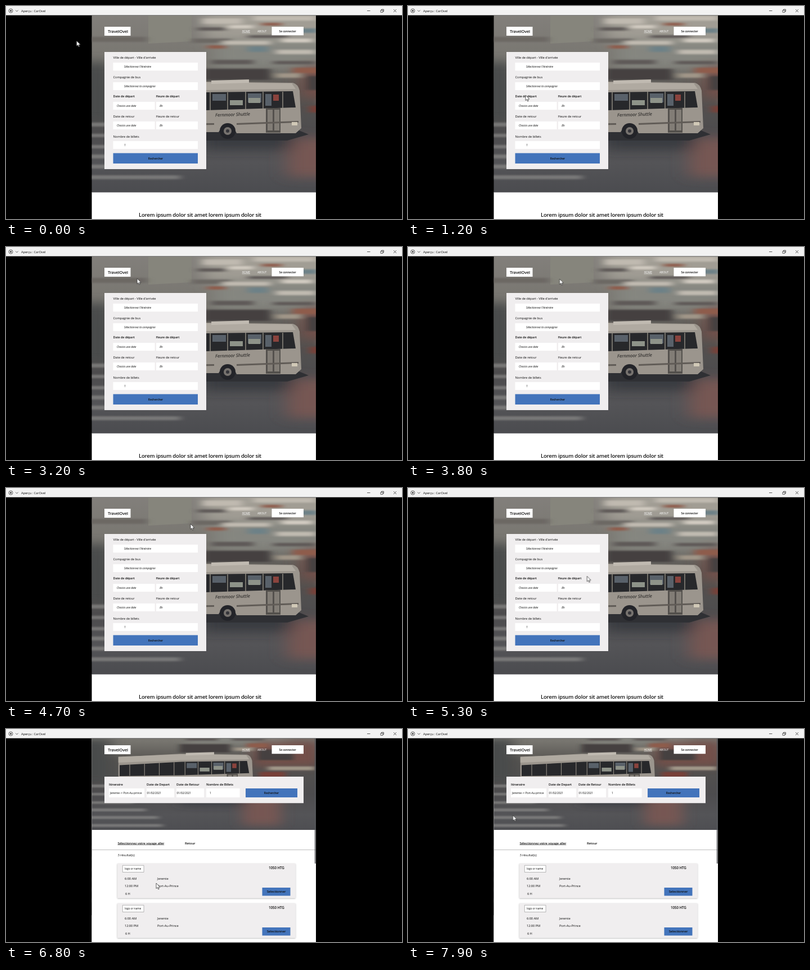
An HTML page for the animation above (8000 ms loop, 704 by 380 pixels).

```html
<!DOCTYPE html>
<html lang="fr">
<head>
<meta charset="utf-8">
<title>Aperçu</title>
<style>
html, body { margin: 0; width: 100%; height: 100%; overflow: hidden; background: #000; }
svg { display: block; width: 100%; height: 100%; }
text { font: 5.8px "Open Sans", "Noto Sans", sans-serif; letter-spacing: -.02em; fill: #111; }
.semi { font-weight: 600; }
.brand { font-size: 7.4px; font-weight: 600; }
.nav { font-size: 5px; fill: #fff; }
.small { font-size: 5px; }
.hint { font-size: 5px; font-style: italic; }
.mid { text-anchor: middle; }
.line { text-decoration: underline; }
.panel { fill: #f0eeef; }
.white { fill: #fff; }
.blue { fill: #4374bb; }
.icon { fill: none; stroke: #333; stroke-width: .8; }

.results { animation: results 8s step-end infinite; }
.arrow { animation: arrow 8s step-end infinite; }
.hand { animation: hand 8s step-end infinite; }
.pointer { animation: travel 8s step-end infinite; }

@keyframes results { 0% { visibility: hidden } 85%, 100% { visibility: visible } }
@keyframes arrow { 0% { visibility: visible } 72.5% { visibility: hidden } 85%, 100% { visibility: visible } }
@keyframes hand { 0% { visibility: hidden } 72.5% { visibility: visible } 85%, 100% { visibility: hidden } }
/* The pointer moves every 100 ms while in motion. */
@keyframes travel {
  0% { transform: translate(125.5px, 62px); animation-timing-function: steps(6) }
  7.5% { transform: translate(213px, 98px) }
  8.75% { transform: translate(213px, 98px); animation-timing-function: steps(5) }
  15% { transform: translate(209px, 159px) }
  18.75% { transform: translate(209px, 159px); animation-timing-function: steps(3) }
  22.5% { transform: translate(207px, 159px) }
  27.5% { transform: translate(207px, 159px); animation-timing-function: steps(3) }
  31.25% { transform: translate(205.5px, 112px); animation-timing-function: steps(6) }
  38.75% { transform: translate(227px, 56px); animation-timing-function: steps(7) }
  47.5% { transform: translate(269.5px, 57px); animation-timing-function: steps(2) }
  50% { transform: translate(280px, 58px) }
  52.5% { transform: translate(280px, 58px); animation-timing-function: steps(5) }
  58.75% { transform: translate(328px, 64px); animation-timing-function: steps(4) }
  63.75% { transform: translate(338px, 110px); animation-timing-function: steps(7) }
  72.5% { transform: translate(269px, 275.5px) }
  85% { transform: translate(267px, 275px) }
  91.25% { transform: translate(267px, 275px); animation-timing-function: steps(6) }
  98.75%, 100% { transform: translate(186.5px, 154px) }
}
</style>
</head>
<body>
<svg viewBox="0 0 704 380">
  <defs>
    <filter id="streak" x="-50%" y="-50%" width="200%" height="200%"><feGaussianBlur stdDeviation="7 1.6"/></filter>
    <filter id="haze" x="-50%" y="-50%" width="200%" height="200%"><feGaussianBlur stdDeviation="16 9"/></filter>
    <filter id="soft" x="-10%" y="-10%" width="120%" height="120%"><feGaussianBlur stdDeviation=".6"/></filter>
    <filter id="shadow"><feDropShadow dx="0" dy=".8" stdDeviation="1" flood-opacity=".35"/></filter>
    <linearGradient id="street" x2="0" y2="1">
      <stop offset="0" stop-color="#84817d"/><stop offset=".3" stop-color="#77756f"/>
      <stop offset=".44" stop-color="#55524f"/><stop offset=".66" stop-color="#4d4c4e"/>
      <stop offset=".8" stop-color="#545457"/><stop offset="1" stop-color="#48494d"/>
    </linearGradient>
    <clipPath id="tall"><path d="M152.5 17H551V332.5H152.5Z"/></clipPath>
    <clipPath id="short"><path d="M152.5 17H551V180H152.5Z"/></clipPath>

    <g id="photo">
      <path fill="url(#street)" d="M100 0H720V350H100Z"/>
      <g filter="url(#haze)">
        <path fill="#a19d94" d="M350 5H580V60H350Z"/>
        <path fill="#858680" d="M370 60H600V110H370Z"/>
        <path fill="#4a4b4c" d="M110 100H190V205H110Z"/>
        <path fill="#735049" d="M525 105H680V165H525Z"/>
        <path fill="#765753" d="M500 235H590V305H500Z"/>
        <path fill="#393a3f" d="M350 225H510V255H350Z"/>
      </g>
      <path fill="#86857c" filter="url(#soft)" d="M253 10H330V63L253 67Z"/>
      <g filter="url(#streak)">
        <path fill="#6c6764" d="M140 55H250V64H140ZM330 58H400V66H330Z"/>
        <path fill="#c0bab0" d="M350 22H420V32H350ZM440 18H550V26H440ZM385 62H470V69H385ZM480 78H550V86H480Z"/>
        <path fill="#d1cbc1" d="M395 34H440V40H395ZM490 58H545V65H490Z"/>
        <path fill="#5e5a58" d="M340 38H390V44H340ZM430 52H500V57H430ZM365 96H440V104H365ZM475 98H550V104H475Z"/>
        <path fill="#8e5c4c" d="M358 70H390V76H358ZM455 30H490V35H455ZM510 110H560V120H510Z"/>
        <path fill="#6d8187" d="M430 72H465V82H430ZM515 40H555V48H515Z"/>
        <path fill="#45403f" d="M350 112H470V132H350ZM535 125H620V150H535Z"/>
        <path fill="#a09688" d="M480 120H525V128H480ZM560 165H670V174H560Z"/>
        <path fill="#783f39" d="M540 178H600V190H540Z"/>
      </g>
      <g fill="#92918f" opacity=".62" filter="url(#streak)">
        <path d="M110 208H205V215H110ZM110 228H225V234H110ZM110 248H240V254H110ZM110 265H270V272H110ZM110 283H300V290H110ZM110 302H310V309H110Z"/>
      </g>
      <g filter="url(#soft)">
        <path fill="#2f3034" d="M215 220H516L538 229L500 240H230Z"/>
        <path fill="#9b958d" d="M205 143L350 135L510 137Q519 139 522 151L525 218L515 227H410A17 17 0 0 0 378 225H205Z"/>
        <path fill="#b0aaa1" d="M205 142L355 136L508 138L515 148L355 150L205 156Z"/>
        <path fill="#c0bab1" d="M365 133L432 131V137L365 139Z"/>
        <path fill="#27282b" d="M208 162L355 154L510 152L515 181L355 186L208 188Z"/>
        <path fill="none" stroke="#8f8980" stroke-width="1.5" d="M232 160V187M267 158V187M302 156V186M337 155V186M363 154V186M394 154V185M426 153V184M457 153V183M492 153V182"/>
        <path fill="#59616a" d="M367 157H391V169H367ZM430 156H454V172H430ZM461 157H472V178H461Z"/>
        <path fill="#8e9389" d="M431 164H452V173H431ZM398 168H421V177H398Z"/>
        <path fill="#8a433d" d="M475 158H485V169H475Z"/>
        <path fill="#54514d" d="M462 182H488V226H462Z"/>
        <path fill="#827d76" d="M465 185H474V222H465ZM477 185H486V222H477Z"/>
        <path fill="#615c57" d="M205 211L370 209V212L205 215ZM410 209L520 205V208L410 212Z"/>
        <path fill="#d1c9b7" d="M508 207H518V213H508Z"/>
        <circle cx="394" cy="223" r="14" fill="#232429"/>
        <circle cx="394" cy="223" r="7" fill="#77736f"/>
        <circle cx="394" cy="223" r="3" fill="#35353a"/>
      </g>
      <text x="372" y="197.5" transform="rotate(-2 372 197)" style="font-size:8.1px;font-style:italic;font-weight:600;fill:#393735">Fernmoor Shuttle</text>
    </g>

    <g id="header">
      <path class="white" d="M175 37H221.5V53H175ZM472.500 37H529V52.300H472.500Z"/>
      <text class="brand" x="181" y="48.300">TravelOvel</text>
      <text class="nav line" x="419.500" y="46.700">HOME</text>
      <text class="nav" x="447" y="46.700">ABOUT</text>
      <text class="small semi mid" x="500.500" y="46.500">Se connecter</text>
    </g>

    <g id="card">
      <path class="panel" filter="url(#shadow)" d="M198 240H514.500V301.500H198Z"/>
      <path fill="#fff" stroke="#8b8b8b" stroke-width=".6" d="M207.300 243.300H245V255.500H207.300Z"/>
      <text x="211" y="251" style="font-size:4.9px">logo or name</text>
      <text x="211" y="268.500">6:00 AM</text>
      <text x="211" y="282">12:00 PM</text>
      <text x="212" y="296">6 H</text>
      <text x="269" y="268.800">Jeremie</text>
      <text x="269" y="282">Port-Au-Prince</text>
      <text class="semi" x="467" y="250.300" style="font-size:6.3px">1050 HTG</text>
      <path class="blue" d="M455.500 283H505.500V297.500H455.500Z"/>
      <text class="semi mid" x="480.500" y="292.300">Selectionner</text>
    </g>
  </defs>

  <path d="M0 0H704V380H0Z"/>
  <path fill="#f2f2f2" d="M0 0H704V16.500H0Z"/>
  <circle class="icon" cx="8.500" cy="8.500" r="3.500"/>
  <circle cx="8.500" cy="8.500" r="1.500" fill="#333"/>
  <path class="icon" d="M17 7.500L19.300 9.800L21.600 7.500M642 8.500H647.500M666 7.500H670V11.200H666ZM667.500 7.300V6H671.500V9.700H670.200M689 6L694 11M694 6L689 11"/>
  <text x="27" y="10.700">Aperçu : CarOvel</text>

  <g>
    <path class="white" d="M152.500 332H551V380H152.500Z"/>
    <g clip-path="url(#tall)"><use href="#photo"/></g>
    <use href="#header"/>
    <path class="panel" d="M175 82H356V291H175Z"/>
    <path class="white" d="M190.500 101H341V115.300H190.500ZM190.500 136H341V150H190.500ZM190.500 171H264.500V185H190.500ZM267 171H341V185H267ZM190.500 206H264.500V220H190.500ZM267 206H341V220H267ZM190.500 241H341V255H190.500Z"/>
    <path class="blue" d="M190.500 262.500H341V281H190.500Z"/>
    <text x="190.500" y="94">Ville de départ - Ville d'arrivée</text>
    <text x="190.500" y="128.500">Compagnie de bus</text>
    <text class="semi" x="190.500" y="163.300" style="font-size:5.500px">Date de départ</text>
    <text class="semi" x="266.500" y="163.300" style="font-size:5.500px">Heure de départ</text>
    <text x="190.500" y="199">Date de retour</text>
    <text x="266.500" y="199">Heure de retour</text>
    <text x="190.500" y="235">Nombre de billets</text>
    <text class="hint" x="210" y="110">Sélectionnez l'itinéraire</text>
    <text class="hint" x="210" y="145">Sélectionnez la compagnie</text>
    <text class="hint" x="197" y="180">Choisis une date</text>
    <text class="hint" x="273" y="180">8h</text>
    <text class="hint" x="197" y="215.300">Choisis une date</text>
    <text class="hint" x="273" y="215.300">8h</text>
    <text class="hint" x="210" y="250">1</text>
    <text class="small semi mid" x="266" y="273.700">Rechercher</text>
    <text class="semi" x="236" y="376" style="font-size:9.500px">Lorem ipsum dolor sit amet lorem ipsum dolor sit</text>
  </g>

  <g class="results">
    <path class="white" d="M152.500 17H551V380H152.500Z"/>
    <g clip-path="url(#short)"><use href="#photo" transform="translate(46 -57) scale(.75)"/></g>
    <use href="#header" y="-8"/>
    <path class="panel" d="M175 85H529V132.300H175Z"/>
    <path class="white" d="M183 106H246V122H183ZM250 106H299V122H250ZM303 106H352V122H303ZM356 106H415.500V122H356Z"/>
    <path class="blue" d="M426 106H518V122H426Z"/>
    <g class="labels">
      <text class="semi" x="183" y="101.300">Itineraire</text>
      <text class="semi" x="250" y="101.300">Date de Depart</text>
      <text class="semi" x="303" y="101.300">Date de Retour</text>
      <text class="semi" x="356" y="101.300">Nombre de Billets</text>
    </g>
    <text class="small" x="185" y="115.700">Jeremie -&gt; Port-Au-prince</text>
    <text class="small" x="250.500" y="115.700">01/02/2021</text>
    <text class="small" x="303.500" y="115.700">01/02/2021</text>
    <text class="small" x="362" y="115.700">1</text>
    <text class="small semi mid" x="472" y="115.800">Rechercher</text>
    <text class="semi line" x="198.500" y="205.500">Sélectionnez votre voyage aller</text>
    <text class="semi" x="318" y="205.500">Retour</text>
    <path stroke="#aaa" stroke-width=".8" d="M152.500 215.600H551"/>
    <text x="198.500" y="226.500">3 résultat(s)</text>
    <use href="#card"/>
    <use href="#card" y="71"/>
    <path fill="#55575a" d="M548.800 17H550.500V240H548.800Z"/>
  </g>

  <g class="pointer" fill="#fff" stroke="#222" stroke-width=".7" stroke-linejoin="round">
    <path class="arrow" d="M0 0V9.600L2.200 7.600L3.700 11L5.200 10.300L3.800 7.100H6.800Z"/>
    <path class="hand" d="M1.500 1Q2.500 -.2 3.300 1V4.200L7 5Q8.200 5.300 8 6.500L7.200 10.300H3L.2 7Q-.6 5.800 1.500 6.300Z"/>
  </g>
</svg>
</body>
</html>
```
